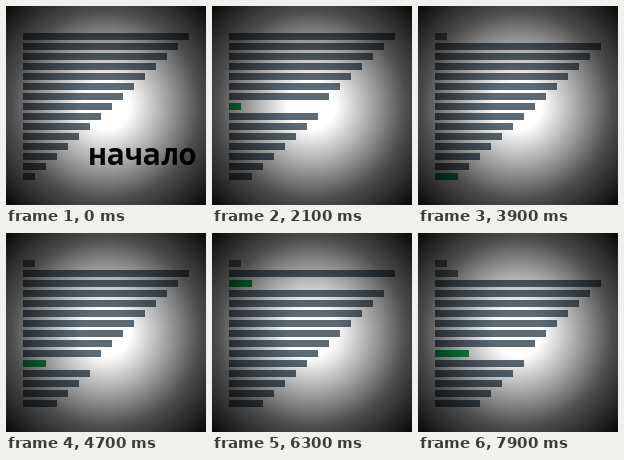
An HTML page that plays this animation: 200x199 px, repeating every 8 s.

```html
<!DOCTYPE html>
<html lang="ru">
<head>
<meta charset="utf-8">
<style>
html, body { margin: 0; width: 100%; height: 100%; overflow: hidden; background: #000; }
svg { display: block; width: 100%; height: 100%; }
text { font: 700 30px "Noto Sans Mono", "DejaVu Sans Mono", monospace; text-anchor: middle; fill: #060708; }
</style>
</head>
<body>
<svg viewBox="0 0 200 199">
  <defs>
    <radialGradient id="shade" gradientUnits="userSpaceOnUse" cx="100" cy="99.5" r="141">
      <stop offset=".17" stop-opacity="0"/>
      <stop offset=".67" stop-opacity=".7"/>
      <stop offset="1" stop-opacity=".97"/>
    </radialGradient>
  </defs>
  <rect width="200" height="199" fill="#fff"/>
  <g id="bars"></g>
  <text id="title" x="136.5" y="159">начало</text>
  <rect width="200" height="199" fill="url(#shade)"/>
</svg>
<script>
const COUNT = 15, LOOP = 8000, START = 500, STEP = 200;
const PLAIN = '#5d6a74', ACTIVE = '#10a052', SORTED = '#767b78';
const $ = id => document.getElementById(id);

const bars = Array.from({ length: COUNT }, (_, i) => {
  const bar = document.createElementNS('http://www.w3.org/2000/svg', 'rect');
  bar.setAttribute('x', 17);
  bar.setAttribute('y', 27 + 10 * i);
  bar.setAttribute('height', 7);
  return $('bars').appendChild(bar);
});

// Each pass: one idle step, then the last bar climbs to the sorted part.
function stateAt(time) {
  let step = Math.floor((time - START) / STEP), sorted = 0;
  if (step < 0) return { sorted, pos: -1 };
  while (step > COUNT - sorted) {
    step -= COUNT - sorted + 1;
    sorted++;
  }
  return { sorted, pos: step ? COUNT - step : -1 };
}

function draw(time) {
  const { sorted, pos } = stateAt(time);
  const order = Array.from({ length: COUNT }, (_, i) =>
    i < sorted ? i + 1 : COUNT + sorted - i);
  if (pos >= 0) order.splice(pos, 0, order.pop());
  bars.forEach((bar, i) => {
    bar.setAttribute('width', 1 + 11 * order[i]);
    bar.setAttribute('fill', i === pos ? ACTIVE : i < sorted ? SORTED : PLAIN);
  });
  $('title').style.display = time < START ? '' : 'none';
}

let begin = null;
function tick(now) {
  if (begin === null) begin = now;
  draw((now - begin) % LOOP);
  requestAnimationFrame(tick);
}
draw(0);
requestAnimationFrame(tick);
</script>
</body>
</html>
```
